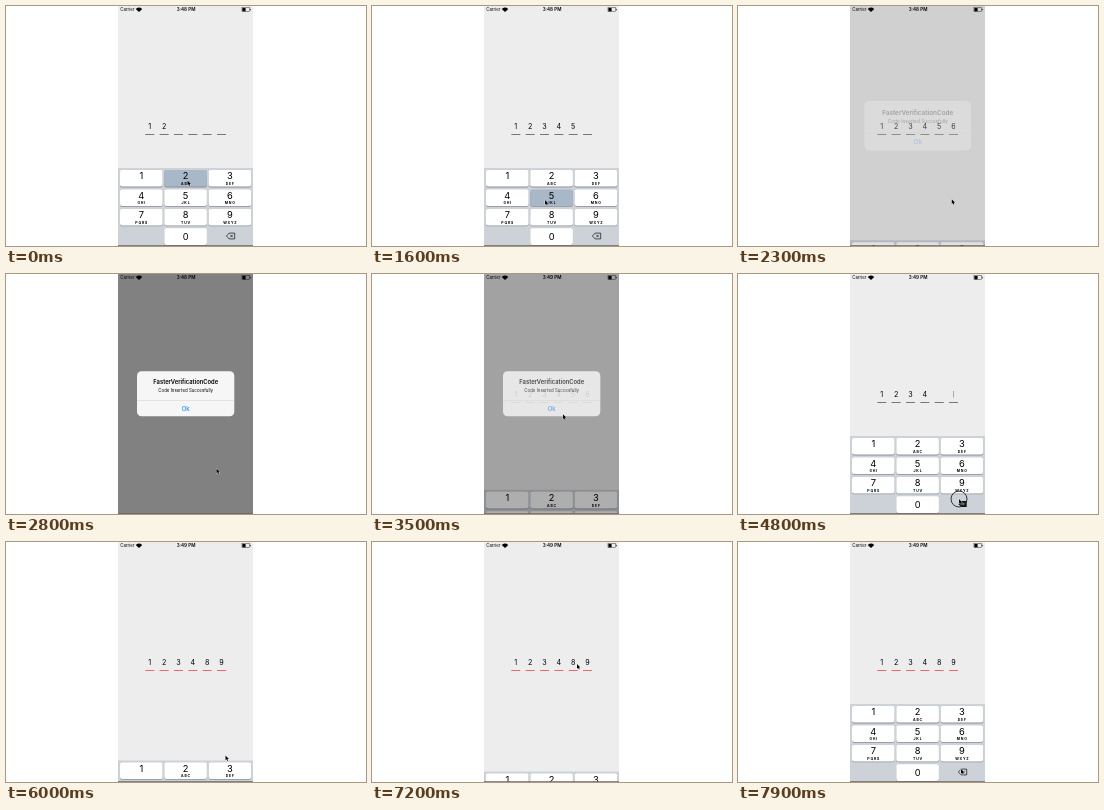
These frames come from a looping animation (360 by 240 pixels, 8000 ms). An HTML page with a canvas:

```html
<!DOCTYPE html>
<html lang="en">
<head>
<meta charset="utf-8">
<style>
  html, body { margin: 0; width: 100%; height: 100%; overflow: hidden; background: #fff; }
  canvas { display: block; width: 360px; height: 240px; }
</style>
</head>
<body>
<canvas id="stage"></canvas>
<script>
const canvas = document.getElementById('stage');
const ctx = canvas.getContext('2d');
const ratio = window.devicePixelRatio || 1;
canvas.width = 360 * ratio;
canvas.height = 240 * ratio;

const LOOP = 8000, STEP = 100;
const LEFT = 112, WIDTH = 135, KEYS_TOP = 162, KEYS_HEIGHT = 78;
const LETTERS = ['', 'ABC', 'DEF', 'GHI', 'JKL', 'MNO', 'PQRS', 'TUV', 'WXYZ'];

// Moment and key of every press; '<' deletes.
const PRESSES = [[-60, '2'], [470, '3'], [1080, '4'], [1550, '5'], [2000, '6'],
  [4480, '<'], [4780, '<'], [5220, '8'], [5620, '9']];
const TAPS = [3220, 7120];

// Pointer path: time, x, y.
const PATH = [[0, 181.5, 174.5], [150, 181.5, 174.5], [400, 222, 174], [600, 222, 174],
  [950, 143, 191], [1150, 143, 191], [1450, 173, 194], [1650, 173, 194],
  [1900, 217, 192], [2100, 217, 192], [2500, 210.5, 194.5], [2800, 210.5, 194.5],
  [3100, 182, 134], [3400, 182, 134], [3700, 216.5, 158.5], [4300, 221, 225],
  [4850, 221, 225], [5100, 184, 210], [5280, 184, 210], [5500, 219.5, 213.5],
  [6350, 219.5, 213.5], [6950, 205, 122], [7250, 205, 122], [7800, 223, 227]];

const clamp = v => Math.max(0, Math.min(1, v));
const progress = (t, start, length) => clamp((t - start) / length);
const easeOut = p => 1 - (1 - p) ** 3;

function box(x, y, w, h, r, color) {
  ctx.fillStyle = color;
  ctx.beginPath();
  ctx.roundRect(x, y, w, h, r);
  ctx.fill();
}

function text(str, x, y, size, { weight = 400, color = '#000', align = 'center', spacing = 0 } = {}) {
  ctx.font = `${weight} ${size}px Inter, Roboto, sans-serif`;
  ctx.letterSpacing = spacing + 'px';
  ctx.textAlign = align;
  ctx.fillStyle = color;
  ctx.fillText(str, x + spacing / 2, y + size * 0.363);
}

function statusBar(t) {
  text('Carrier', 114.3, 3.7, 4.3, { align: 'left' });
  ctx.fillStyle = '#000';
  ctx.beginPath();
  ctx.moveTo(133, 6);
  ctx.arc(133, 6, 4.4, -Math.PI * 0.77, -Math.PI * 0.23);
  ctx.fill();
  text(t < 3200 ? '3:48 PM' : '3:49 PM', 180, 3.7, 4.6, { weight: 600 });
  ctx.strokeStyle = '#333';
  ctx.lineWidth = 0.5;
  ctx.strokeRect(236, 1.6, 7.6, 4);
  box(236.4, 2, 3.2, 3.2, 0.3, '#000');
  box(244, 2.8, 0.8, 1.6, 0.3, '#333');
}

function codeAt(t) {
  let code = '1', before = 0, changed = -1000;
  for (const [at, key] of PRESSES) {
    if (at > t) break;
    before = code.length;
    code = key === '<' ? code.slice(0, -1) : code + key;
    changed = at;
  }
  return { code, before, fresh: t - changed < 60 };
}

function codeField(t, hidden) {
  const { code, before, fresh } = codeAt(t);
  const slotX = i => 143.8 + 14.35 * i;
  for (let i = 0; i < 6; i++) {
    box(slotX(i) - 4.5, 128, 9, 1, 0, code === '123489' ? '#ee6a60' : '#777');
    if (code[i]) text(code[i], slotX(i), 120, 7.2);
  }
  const blinkOn = t % 1000 >= 200 && t % 1000 < 700;
  const slot = fresh ? before : code.length;
  if (slot < 6 && hidden === 0 && (fresh || blinkOn)) {
    box(slotX(slot) - 0.4, 117, 0.8, 6.5, 0, fresh ? '#999' : '#555');
  }
}

function backspaceIcon(x, y, filled) {
  ctx.beginPath();
  ctx.moveTo(x - 4.3, y);
  ctx.lineTo(x - 1.6, y - 2.9);
  ctx.lineTo(x + 4, y - 2.9);
  ctx.lineTo(x + 4, y + 2.9);
  ctx.lineTo(x - 1.6, y + 2.9);
  ctx.closePath();
  ctx.lineWidth = 0.7;
  ctx.strokeStyle = ctx.fillStyle = '#111';
  filled ? ctx.fill() : ctx.stroke();
  ctx.strokeStyle = filled ? '#ccc' : '#111';
  ctx.beginPath();
  for (const d of [-1.2, 1.2]) {
    ctx.moveTo(x + 0.8 - 1.2, y - d);
    ctx.lineTo(x + 0.8 + 1.2, y + d);
  }
  ctx.stroke();
}

function keyboard(t, hidden) {
  const top = KEYS_TOP + KEYS_HEIGHT * hidden;
  const press = PRESSES.find(([at]) => t >= at - 100 && t < at + 120);
  const held = press && press[1];
  box(LEFT, top, WIDTH, KEYS_HEIGHT + 1, 0, '#cdd1d8');
  const key = (label, col, row) => {
    const x = 114 + 44.3 * col, y = top + 2 + 19.45 * row, mid = x + 21.3;
    box(x, y + 0.8, 42.6, 16.6, 2, '#8d9096');
    box(x, y, 42.6, 16.6, 2, held === label ? '#a8b8c8' : '#fff');
    text(label, mid, y + (row === 3 ? 8 : 6.1), 9.3);
    if (row < 3) text(LETTERS[label - 1], mid, y + 13.4, 3.5, { weight: 700, spacing: 0.8 });
  };
  for (let n = 0; n < 9; n++) key(String(n + 1), n % 3, Math.floor(n / 3));
  key('0', 1, 3);
  backspaceIcon(224.7, top + 68, held === '<');
}

function alertBox(t) {
  const shown = progress(t, 2200, 380);
  const left = 1 - progress(t, 3450, 430);
  if (!shown || !left) return;
  ctx.fillStyle = `rgba(0, 0, 0, ${0.46 * shown * left ** 3})`;
  ctx.fillRect(LEFT, 0, WIDTH, 240);
  ctx.save();
  ctx.globalAlpha = shown * left ** 1.5;
  const scale = 1 + 0.18 * (1 - shown) ** 2;
  ctx.translate(179.7, 120);
  ctx.scale(scale, scale);
  ctx.translate(-179.7, -120);
  box(131, 97.3, 97.3, 45, 4.5, '#f6f6f6');
  if (t >= 3120 && t < 3450) box(131, 126.3, 97.3, 16, [0, 0, 4.5, 4.5], '#e6e6e6');
  box(131, 126, 97.3, 0.5, 0, '#d2d2d4');
  // Text vanishes ahead of its panel on dismissal.
  ctx.globalAlpha = shown * left ** 3;
  text('FasterVerificationCode', 179.7, 108.3, 5.8, { weight: 600 });
  text('Code Inserted Succesfully', 179.7, 116, 4.4);
  text('Ok', 179.7, 134.3, 6.1, { color: '#0a7aff' });
  ctx.restore();
}

function pointerAt(t) {
  const next = PATH.findIndex(([at]) => at > t);
  if (next < 0) return PATH[PATH.length - 1].slice(1);
  const [t0, x0, y0] = PATH[next - 1], [t1, x1, y1] = PATH[next];
  const p = (t - t0) / (t1 - t0), e = p * p * (3 - 2 * p);
  return [x0 + (x1 - x0) * e, y0 + (y1 - y0) * e];
}

function pointer(t) {
  const [x, y] = pointerAt(t);
  const pressed = [...PRESSES.map(([at]) => at), ...TAPS].some(at => t >= at - 100 && t < at + 30);
  if (pressed) {
    ctx.beginPath();
    ctx.arc(x, y, 8, 0, Math.PI * 2);
    ctx.lineWidth = 0.9;
    ctx.strokeStyle = '#222';
    ctx.stroke();
  }
  ctx.beginPath();
  for (const [dx, dy] of [[0, 0], [0, 4.8], [1.1, 3.8], [1.9, 5.5], [2.7, 5.1], [1.9, 3.5], [3.4, 3.4]]) {
    ctx.lineTo(x + dx, y + dy);
  }
  ctx.closePath();
  ctx.lineWidth = 0.6;
  ctx.strokeStyle = '#fff';
  ctx.stroke();
  ctx.fillStyle = '#000';
  ctx.fill();
}

// 0 = keyboard fully up, 1 = fully down.
function keyboardHidden(t) {
  const move = start => easeOut(progress(t, start, 430));
  return move(2050) - move(3450) + move(5850) - move(7180);
}

function draw(now) {
  const t = Math.floor((now % LOOP) / STEP) * STEP;
  const hidden = keyboardHidden(t);
  ctx.setTransform(ratio, 0, 0, ratio, 0, 0);
  ctx.fillStyle = '#fff';
  ctx.fillRect(0, 0, 360, 240);
  ctx.save();
  ctx.beginPath();
  ctx.rect(LEFT, 0, WIDTH, 240);
  ctx.clip();
  box(LEFT, 0, WIDTH, 240, 0, '#ededed');
  statusBar(t);
  codeField(t, hidden);
  keyboard(t, hidden);
  alertBox(t);
  box(LEFT, 239.2, WIDTH, 0.8, 0, '#666');
  ctx.restore();
  pointer(t);
}

let start;
function tick(now) {
  start ??= now;
  draw(now - start);
  requestAnimationFrame(tick);
}
requestAnimationFrame(tick);
</script>
</body>
</html>
```
